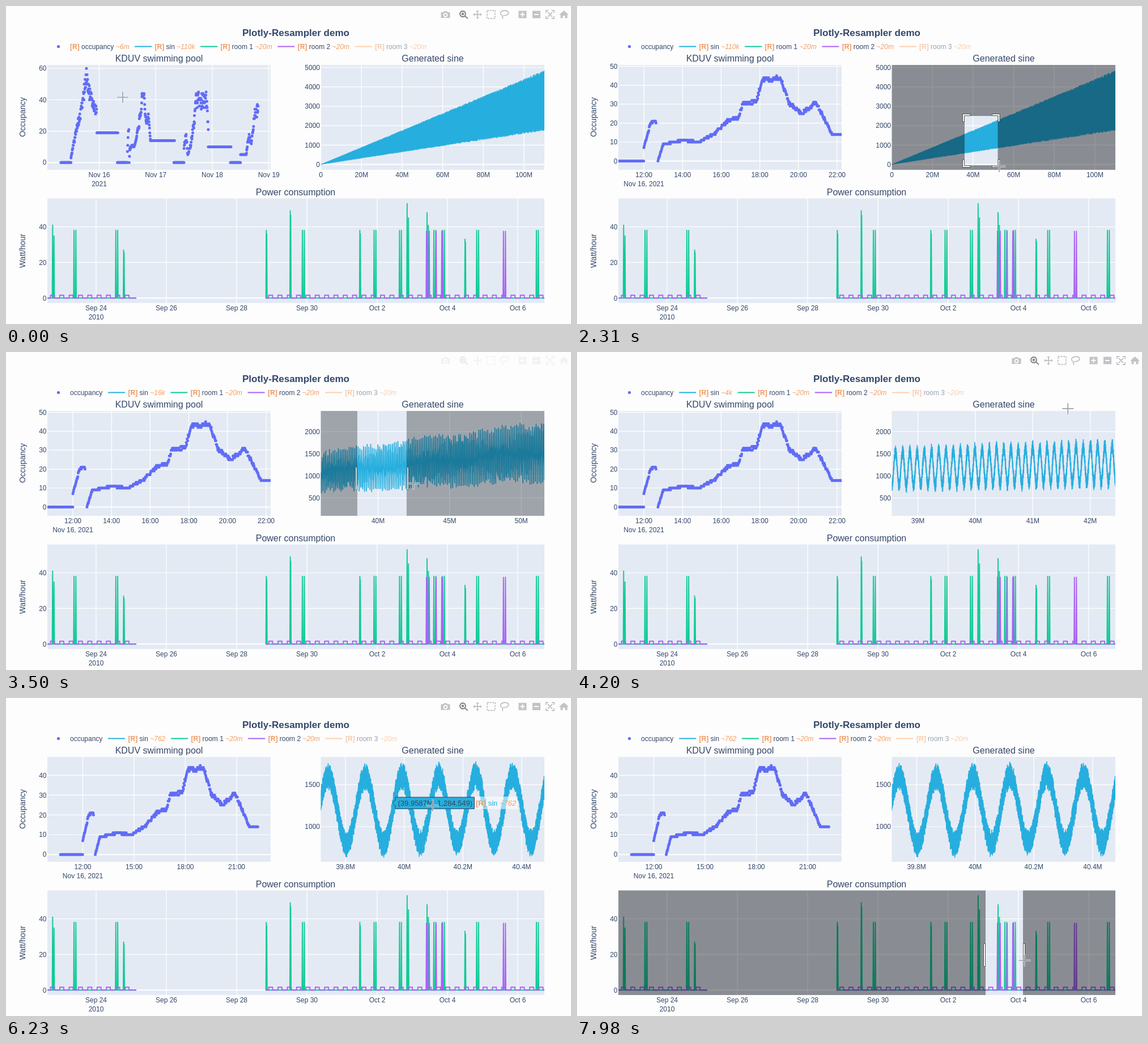
These frames come from a looping animation (997 by 561 pixels, 8 s). An HTML page:

```html
<!DOCTYPE html>
<html lang="en">
<head>
<meta charset="utf-8">
<title>Resampler demo</title>
<style>
html, body { margin: 0; width: 100%; height: 100%; overflow: hidden; background: #fdfdfd; }
svg { display: block; width: 100%; height: 100%; }
text { font-family: "Liberation Sans", Arial, sans-serif; font-size: 12px; fill: #33476a; white-space: pre; }
.h1 { font-size: 17px; font-weight: bold; }
.h2 { font-size: 16px; }
.axis { font-size: 14px; }
.r { font-weight: bold; fill: #ec9a62; }
.n { font-style: italic; fill: #f2a065; }
.hover text { font-size: 13px; }
.mid { text-anchor: middle; }
.end { text-anchor: end; }
</style>
</head>
<body>
<svg id="stage" viewBox="0 0 997 561"></svg>
<script>
const LOOP = 8000, STEP = 70;
const BLUE = '#26aede', GREEN = '#0fcb95', PURPLE = '#a862f4', DOT = '#606cf6', ORANGE = '#ffa15a';
const BOX = { pool: [73, 104, 394, 185], sine: [555.5, 104, 394.5, 185], power: [73, 339.5, 877, 184.5] };
const stage = document.getElementById('stage');

function el(parent, tag, attrs = {}, text) {
  const e = document.createElementNS('http://www.w3.org/2000/svg', tag);
  for (const k in attrs) e.setAttribute(k, attrs[k]);
  if (text !== undefined) e.textContent = text;
  parent.appendChild(e);
  return e;
}
const group = (parent = stage, attrs) => el(parent, 'g', attrs);
const label = (p, x, y, s, cls) => el(p, 'text', { x, y, class: cls }, s);
const show = (e, on) => e.setAttribute('display', on ? 'inline' : 'none');
const clamp = v => Math.max(0, Math.min(1, v));
const mix = (a, b, k) => a + (b - a) * k;
const f = v => v.toFixed(2);
const range = (from, to, step) =>
  Array.from({ length: Math.round((to - from) / step) + 1 }, (_, i) => +(from + i * step).toFixed(1));

function random(seed) {
  return () => {
    seed = (seed + 0x6D2B79F5) | 0;
    let t = Math.imul(seed ^ (seed >>> 15), 1 | seed);
    t = (t + Math.imul(t ^ (t >>> 7), 61 | t)) ^ t;
    return ((t ^ (t >>> 14)) >>> 0) / 4294967296;
  };
}

for (const k in BOX) {
  const [x, y, width, height] = BOX[k];
  el(el(stage, 'clipPath', { id: 'clip-' + k }), 'rect', { x, y, width, height });
}

// Background, grid and tick labels; returns a clipped group for the data.
function plot(parent, name, xTicks, yTicks, Y) {
  const [x, y, width, height] = BOX[name];
  const line = (d, w) => el(parent, 'path', { d, stroke: '#fff', 'stroke-width': w });
  el(parent, 'rect', { x, y, width, height, fill: '#e4eaf4' });
  for (const [px, s, sub] of xTicks) {
    line(`M${px} ${y}v${height}`, 1.2);
    label(parent, px, y + height + 13, s, 'mid');
    if (sub) label(parent, px, y + height + 28.5, sub, 'mid');
  }
  for (const v of yTicks) {
    line(`M${x} ${f(Y(v))}h${width}`, v ? 1.2 : 2);
    label(parent, x - 1.5, Y(v) + 4.2, v, 'end');
  }
  return group(parent, { 'clip-path': `url(#clip-${name})` });
}

// ---- titles
label(stage, 511.5, 53, 'Plotly-Resampler demo', 'h1 mid');
label(stage, 270, 98, 'KDUV swimming pool', 'h2 mid');
label(stage, 753, 98, 'Generated sine', 'h2 mid');
label(stage, 511, 334, 'Power consumption', 'h2 mid');
for (const [s, y] of [['Occupancy', 196], ['Watt/hour', 432]])
  el(stage, 'text', { class: 'axis mid', transform: `translate(33.5 ${y}) rotate(-90)` }, s);

// ---- legend
function entry(p, x, y, name, count, nameFill) {
  const t = el(p, 'text', { x, y });
  if (count) el(t, 'tspan', { class: 'r' }, '[R] ');
  const n = el(t, 'tspan', {}, name);
  if (nameFill) n.style.fill = nameFill;
  if (count) el(t, 'tspan', { class: 'n' }, ' ~' + count);
  return t.getComputedTextLength();
}
function legend(poolCount, sinCount) {
  const g = group();
  el(g, 'circle', { cx: 92.5, cy: 71.5, r: 2.6, fill: DOT });
  let x = 113 + entry(g, 113, 76, 'occupancy', poolCount) + 45.2;
  const rows = [['sin', BLUE, sinCount], ['room 1', GREEN, '20m'], ['room 2', PURPLE, '20m'], ['room 3', ORANGE, '20m']];
  for (const [name, stroke, count] of rows) {
    const row = group(g, { opacity: name === 'room 3' ? 0.5 : 1 });
    el(row, 'path', { d: `M${x - 35.5} 71.5h30`, stroke, 'stroke-width': 2 });
    x += entry(row, x, 76, name, count) + 45.2;
  }
  return g;
}
const legends = [
  [0, legend('6m', '110k')],
  [1260, legend('', '110k')],
  [2660, legend('', '16k')],
  [3920, legend('', '4k')],
  [5740, legend('', '762')]
];

// ---- swimming pool: each day opens at noon, key points are [hours open, visitors]
const DAYS = [
  { noise: 0.2, night: 19, keys: [[0, 3], [2.7, 24], [3.9, 29], [6.6, 55], [8, 43], [9.5, 37], [11, 32]] },
  { noise: 0.06, night: 14, keys: [[0, 7], [0.35, 20], [0.65, 21], [0.73, 0], [1, 9], [2.1, 11], [2.8, 10], [3.6, 14],
    [4.3, 21], [4.9, 23], [5.1, 30], [5.8, 31], [6.15, 43], [7.05, 44], [7.5, 31], [8.15, 25], [8.9, 31], [9.75, 14]] },
  { noise: 0.25, night: 10, keys: [[0, 10], [0.9, 18], [1.6, 5], [2.8, 11], [4.5, 28], [5, 41], [7.4, 39], [9.6, 40], [10.3, 22]] },
  { noise: 0.25, keys: [[0, 5], [2.4, 5], [3.4, 17], [4.6, 13], [6.3, 33], [7.5, 33]] }
];
function visitors(step) {
  const out = [], r = random(5);
  const run = (a, b, value) => { for (let h = a; h < b; h += step) out.push([h, value((h - a) / (b - a))]); };
  DAYS.forEach(({ noise, night, keys }, day) => {
    const noon = 24 * day - 12;
    run(noon - 4.3, noon, () => 0);
    for (let i = 1; i < keys.length; i++) {
      const [h0, v0] = keys[i - 1], [h1, v1] = keys[i];
      if (v0 - v1 > 20) continue;
      run(noon + h0, noon + h1, k => {
        const v = mix(v0, v1, k);
        return Math.round(v + (r() - 0.5) * v * noise);
      });
    }
    if (night) run(noon + keys[keys.length - 1][0], noon + 20, () => night);
  });
  return out;
}
function pool(points, X, Y, xTicks, yTicks) {
  const g = group();
  const data = plot(g, 'pool', xTicks.map(([h, ...s]) => [X(h), ...s]), yTicks, Y);
  const d = points.map(([h, v]) => `M${f(X(h))} ${f(Y(v))}h0`).join('');
  el(data, 'path', { d, stroke: DOT, 'stroke-width': 5, 'stroke-linecap': 'round' });
  return g;
}
const coarse = visitors(0.116);
const fine = visitors(0.0232).filter(([h]) => h > 10.68 && h < 22.25);
const clock = (from, to, step) => range(from, to, step).map(h => [h, h + ':00', h === 12 && 'Nov 16, 2021']);
const zoomX = h => 118 + 34.1 * (h - 12), zoomY = v => 273.4 - 3.34 * v;
const dates = [16, 17, 18, 19].map((d, i) => [24 * i, 'Nov ' + d, !i && '2021']);
const pools = [
  [0, pool(coarse, h => 164.5 + 4.156 * h, v => 276.2 - 2.767 * v, dates, range(0, 60, 20))],
  [800, pool(coarse, zoomX, zoomY, clock(12, 22, 2), range(0, 50, 10))],
  [1260, pool(fine, zoomX, zoomY, clock(12, 22, 2), range(0, 50, 10))],
  [4690, pool(fine, h => 135.5 + 30.17 * (h - 12), v => 276.2 - 3.495 * v, clock(12, 21, 3), range(0, 40, 10))]
];

// ---- sine: (3 + sin(x / 20000) + noise) * x / 1e5, x in millions
function sine(c, k, y0, ky, xTicks, yTicks) {
  const g = group(), r = random(21), X = m => c + k * (m - 40), Y = v => y0 - ky * v;
  const [left, , w] = BOX.sine;
  const data = plot(g, 'sine', xTicks.map(m => [X(m), m ? m + 'M' : '0']), yTicks, Y);
  const at = (px, level) => {
    const m = 40 + (px - c) / k;
    return `${f(px)} ${f(Y(level(m) * m * 10))}`;
  };
  const pts = [];
  if (k < 5) {
    for (let i = 0; i <= w * 2; i++) pts.push(at(left + i / 2, () => 4.28 + r() * 0.13));
    for (let i = w * 2; i >= 0; i--) pts.push(at(left + i / 2, () => 1.71 - r() * 0.13));
    el(data, 'path', { d: `M${pts.join('L')}Z`, fill: BLUE, stroke: BLUE, 'stroke-width': 1 });
  } else {
    for (let i = 0; i <= 1000; i++) {
      const noise = (i % 2 ? 1 : -1) * (0.22 + 0.19 * r());
      pts.push(at(left + w * (i + r() - 0.5) / 1000, m => 3 + Math.sin(m * 50) + noise));
    }
    el(data, 'path', { d: 'M' + pts.join('L'), fill: 'none', stroke: BLUE, 'stroke-width': 1.7, 'stroke-linejoin': 'round' });
  }
  return g;
}
const sines = [
  [0, sine(698.9, 3.584, 279.5, 0.0342, range(0, 100, 20), range(0, 5000, 1000))],
  [2450, sine(656.6, 25.26, 296.5, 0.078, range(40, 50, 5), range(500, 2000, 500))],
  [3640, sine(702.9, 101.4, 296.5, 0.078, range(39, 42, 1), range(500, 2000, 500))],
  [4690, sine(702.9, 101.4, 364, 0.134, range(39, 42, 1), [1000, 1500])],
  [5600, sine(702.7, 518, 364, 0.134, range(39.8, 40.4, 0.2), [1000, 1500])],
  [5880, sine(702.7, 518, 375.4, 0.1484, range(39.8, 40.4, 0.2), [1000, 1500])]
];

// ---- power consumption
function power() {
  const Y = v => 515.3 - 3.145 * v;
  const days = ['Sep 24', 'Sep 26', 'Sep 28', 'Sep 30', 'Oct 2', 'Oct 4', 'Oct 6'];
  const data = plot(group(), 'power', days.map((s, i) => [159 + 124 * i, s, !i && '2010']), range(0, 40, 20), Y);
  const spike = (x, v) => `M${x - 0.7} ${Y(0)}L${x} ${Y(v)}L${x + 0.7} ${Y(0)}`;
  const draw = (d, stroke) => el(data, 'path', { d, stroke, fill: 'none', 'stroke-width': 1.9, 'stroke-linejoin': 'round' });
  const spans = [[73, 230], [458, 950]];

  let room1 = spans.map(([a, b]) => `M${a} ${Y(0)}H${b}`).join('');
  for (const x of [120, 193.8, 523, 649.5, 694.4, 755, 770.3, 830.6, 936]) room1 += spike(x, 38) + spike(x + 3.3, 38);
  for (const [x, v] of [[82.3, 41], [207.6, 27], [459.3, 38], [501.6, 49], [624.4, 38], [707.8, 53], [743, 48], [810, 33]])
    room1 += spike(x, v) + (v > 38 && v < 49 || v > 50 ? spike(x + 2.4, v * 0.85) : spike(x + 0.8, v * 0.95));
  draw(room1, GREEN);

  let room2 = '';
  for (const [a, b] of spans) {
    room2 += `M${a} ${Y(0)}`;
    for (let x = a + 5.5; x < b - 7; x += 16.45) room2 += `H${f(x)}v-5h7v5`;
    room2 += `H${b}`;
  }
  for (const x of [742, 746.8, 759, 769, 770.3, 877.8, 881.3]) room2 += spike(x, 37.5);
  draw(room2, PURPLE);
}
power();

// ---- toolbar
const GREY = '#c1c3c7', solid = { fill: GREY, stroke: 'none', 'fill-rule': 'evenodd' };
const bar = group(stage, { fill: 'none', stroke: GREY, 'stroke-width': 1.8 });
const icon = (x, d, attrs = {}) => el(bar, 'path', { d, transform: `translate(${x} 15)`, ...attrs });
icon(775.5, 'M-8-4h4l2-2h4l2 2h4v10h-16zM0-3a4 4 0 1 0 .01 0zM0-1a2 2 0 1 1-.01 0z', solid);
icon(807, 'M-1-6a5 5 0 1 0 .01 0zM3 3l5 4M-3.500-1h5M-1-3.500v5', { stroke: '#7c7f86' });
icon(832, 'M-6 0h12M0-6v12');
icon(832, 'M0-8l3 3h-6zM0 8l3-3h-6zM-8 0l3-3v6zM8 0l-3-3v6z', solid);
icon(856, 'M-7-7h14v14h-14z', { 'stroke-dasharray': '3 1.7' });
icon(880, 'M-5 2c-6-6 1-9 6-9s8 4 4 7-8 1-9 3 2 3 0 5');
icon(911.5, 'M-7-6.500h14v13h-14zM-1-4v3h-3v2h3v3h2v-3h3v-2h-3v-3z', solid);
icon(936, 'M-7-6.500h14v13h-14zM-4-1v2h8v-2z', solid);
icon(960, 'M-7-3v-4h4M3-7h4v4M7 3v4h-4M-3 7h-4v-4M-4-4l8 8M4-4l-8 8');
icon(984.5, 'M-8.500 .5l8.500-7.500 8.500 7.500h-2.500v6h-4v-4.500h-4v4.500h-4v-6z', solid);

// ---- zoom selections; "wide" ones span the full height of their plot
const drags = [
  { name: 'pool', t0: 270, t1: 720, end: 800, x0: 209, y0: 135, x1: 257, y1: 305 },
  { name: 'sine', t0: 1860, t1: 2250, end: 2450, x0: 684, y0: 194, x1: 742.5, y1: 281 },
  { name: 'sine', wide: true, t0: 3320, t1: 3523, end: 3640, x0: 620, y0: 223, x1: 718, y1: 230 },
  { name: 'sine', wide: true, t0: 5270, t1: 5540, end: 5600, x0: 752.5, y0: 136, x1: 674.7, y1: 138 },
  { name: 'power', wide: true, t0: 7600, t1: 7980, end: LOOP, x0: 721, y0: 453.5, x1: 787, y1: 461 }
];
const zoom = group();
const dim = el(zoom, 'path', { 'fill-rule': 'evenodd' });
const grip = el(zoom, 'path', { fill: '#fff', stroke: '#444', 'stroke-width': 0.9 });
const corner = (x, y, sx, sy, len) =>
  `M${x - 0.5 * sx} ${y + len * sy}H${x - 3.5 * sx}V${y - 3.5 * sy}H${x + len * sx}V${y - 0.5 * sy}H${x - 0.5 * sx}Z`;
function drawZoom(t) {
  const d = drags.find(d => t >= d.t0 && t < d.end);
  show(zoom, d);
  if (!d) return;
  const k = clamp((t - d.t0) / (d.t1 - d.t0)), fade = clamp((t - d.t0) / 240);
  const [bx, by, bw, bh] = BOX[d.name], x = mix(d.x0, d.x1, k);
  const l = Math.min(d.x0, x), r = Math.max(d.x0, x);
  const top = d.wide ? by : d.y0, bottom = d.wide ? by + bh : Math.min(by + bh, mix(d.y0, d.y1, k));
  dim.setAttribute('d', `M${bx} ${by}h${bw}v${bh}h${-bw}zM${l} ${top}H${r}V${bottom}H${l}z`);
  dim.setAttribute('fill-opacity', 0.4 * fade);
  const len = Math.min(10, (r - l) / 2, (bottom - top) / 2);
  grip.setAttribute('d', d.wide
    ? [l - 3.5, r + 0.5].map(x => `M${x} ${d.y0 - 20}h3v40h-3z`).join('')
    : corner(l, top, 1, 1, len) + corner(r, top, -1, 1, len) + corner(l, bottom, 1, -1, len) + corner(r, bottom, -1, -1, len));
  grip.setAttribute('opacity', fade);
}

// ---- hover label
const hover = group(stage, { class: 'hover' });
el(hover, 'rect', { x: 827, y: 174, width: 76, height: 22, fill: '#fff', opacity: 0.55 });
el(hover, 'path', { d: 'M682 185l5-5v-5h139.500v20.500h-139.500v-5.500z', fill: BLUE, stroke: '#345' });
label(hover, 691.5, 189.5, '(39.9587M, 1,284.549)').style.fill = '#3a4450';
entry(hover, 829, 189.5, 'sin', '762', BLUE);

// ---- pointer: drags joined by a few rests
const cross = group(stage, { fill: 'none' });
el(cross, 'path', { d: 'M-11 0h22M0-11v22', stroke: '#fff', 'stroke-width': 3.6, opacity: 0.5 });
el(cross, 'path', { d: 'M-10 0h20M0-10v20', stroke: '#8d9096', 'stroke-width': 1.7, opacity: 0.85 });
const resize = group();
el(resize, 'path', { d: 'M-12 0l7-4v8zM12 0l-7-4v8z', fill: '#333', stroke: '#fff', 'stroke-width': 0.8 });
el(resize, 'circle', { r: 3, fill: '#2fa4dc', stroke: '#fff', 'stroke-width': 0.8 });

const rest = (from, to, x, y) => [[from, x, y], [to, x, y]];
const track = [
  ...drags.flatMap(d => [...rest(d.t0 - 90, d.t0, d.x0, d.y0), ...rest(d.t1 - 20, d.end, d.x1 + 2.5, d.y1 + 2)]),
  ...rest(0, 100, 206, 161), ...rest(1000, 1180, 258, 307),
  ...rest(4560, 4720, 960, 15), ...rest(5790, 5900, 960, 15), ...rest(6140, 6850, 753, 190)
].sort((a, b) => a[0] - b[0]);
function drawPointer(t) {
  const i = track.findIndex(p => p[0] > t), [t0, x0, y0] = track[i - 1], [t1, x1, y1] = track[i];
  const k = (t - t0) / (t1 - t0), x = mix(x0, x1, k), y = mix(y0, y1, k);
  const onAxis = y > 290 && y < 325;
  for (const c of [cross, resize]) c.setAttribute('transform', `translate(${f(x)} ${f(y)})`);
  show(resize, onAxis);
  show(cross, !onAxis && y > 30);
}

// The toolbar fades out while dragging and returns afterwards.
const barAlpha = t => Math.min(...drags.map((d, i) => {
  const back = i ? d.end + 80 : 1110;
  return Math.max(1 - clamp((t - d.t0) / 220), clamp((t - back) / 220));
}));
const pick = (states, t) => states.forEach(([from, g], i) =>
  show(g, t >= from && (i + 1 === states.length || t < states[i + 1][0])));

function render(t) {
  pick(legends, t);
  pick(pools, t);
  pick(sines, t);
  bar.setAttribute('opacity', barAlpha(t));
  drawZoom(t);
  show(hover, t >= 6150 && t < 6850);
  drawPointer(t);
}
const start = performance.now();
function tick() {
  const t = (performance.now() - start) % LOOP;
  render(Math.floor(t / STEP) * STEP);
  requestAnimationFrame(tick);
}
tick();
</script>
</body>
</html>
```
